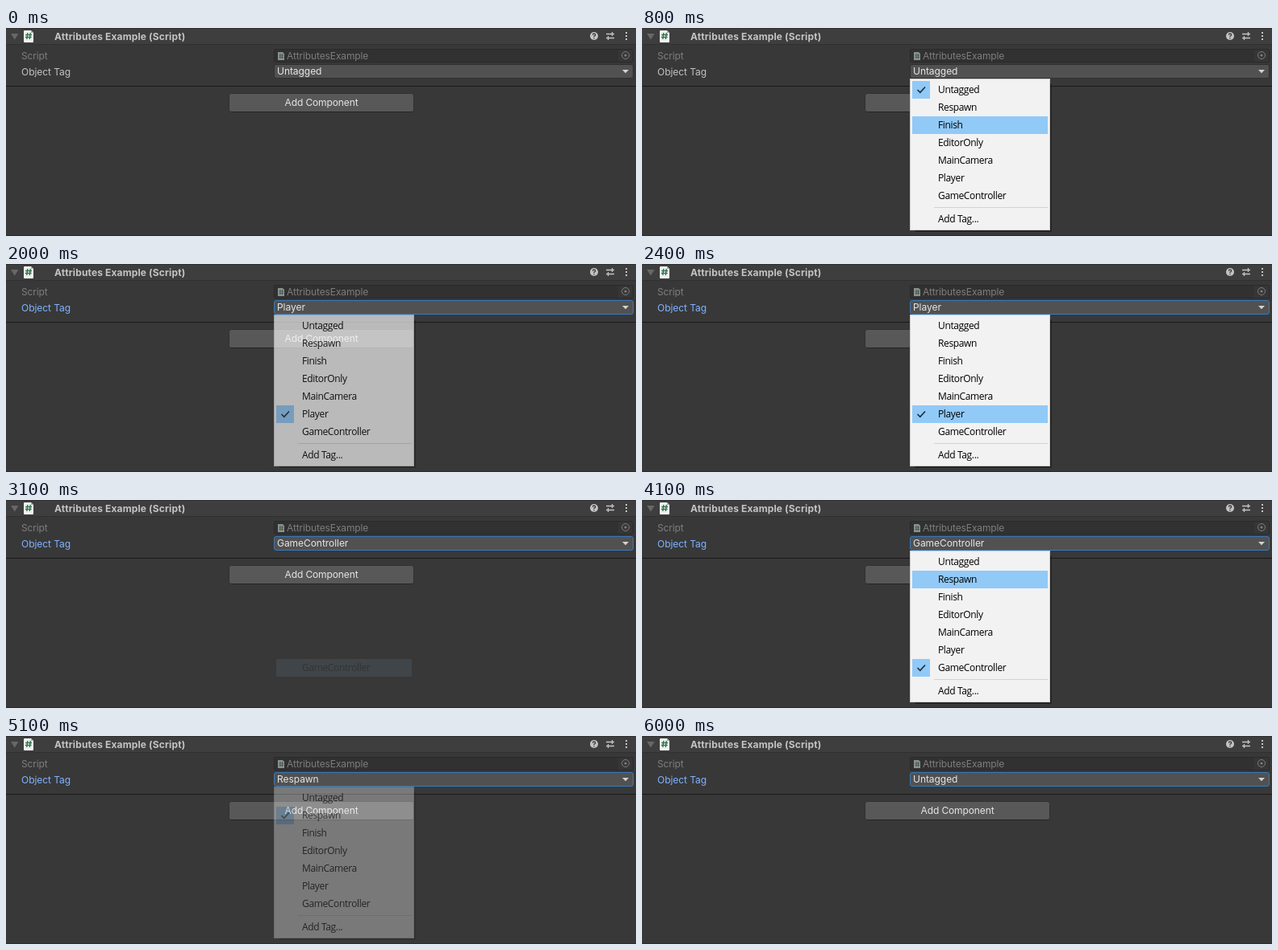
Write an HTML page that moves like this. It is 781 px wide and 259 px high and loops after 6700 ms.

```html
<!DOCTYPE html>
<html lang="en">
<head>
<meta charset="utf-8">
<title>Tag dropdown</title>
<style>
html, body { margin: 0; width: 100%; height: 100%; overflow: hidden; background: #383838; }
svg { display: block; }
text { font: 12px Inter, sans-serif; letter-spacing: -.12px; fill: #c4c4c4; white-space: pre; }
.title { font-weight: 700; letter-spacing: .14px; }
.dim { fill: #7e7e7e; }
.bright { fill: #e6e6e6; }
.focus { fill: #81b4ff; }
#label, #value { letter-spacing: -.05px; }
#menu text, #picked text { font: 12px "Open Sans", "Noto Sans", sans-serif; letter-spacing: -.36px; fill: #000; }
</style>
</head>
<body>
<svg width="781" height="259" viewBox="0 0 781 259">
  <rect width="781" height="259" fill="#383838"/>
  <rect width="781" height="20" fill="#3e3e3e"/>
  <path d="M0 .5H781" stroke="#303030"/>
  <path d="M0 20.5H781" stroke="#303030"/>
  <path d="M0 72.5H781" stroke="#1a1a1a"/>
  <path d="M0 258.5H781" stroke="#2d2a2a"/>

  <path d="M6 7H15.5L10.75 14.5Z" fill="#686868"/>
  <path d="M23 3H31L34 6V17Q34 18 33 18H23Q22 18 22 17V4Q22 3 23 3Z" fill="#f0f0f0"/>
  <path d="M31 3V6H34Z" fill="#a8a8a8"/>
  <path d="M26.8 6L25.8 14M30.3 6L29.3 14M24.2 8.5H32M23.8 11.5H31.6" stroke="#2b7048" stroke-width="1.3"/>
  <text class="title" x="60" y="14.5">Attributes Example (Script)</text>

  <circle cx="729" cy="10" r="5" fill="#c4c4c4"/>
  <path d="M727.3 8.6Q727.5 7 729 7T730.7 8.6Q730.6 9.6 729 10.2V11.2M729 12.2V13.4" stroke="#3e3e3e" stroke-width="1.3" fill="none"/>
  <path d="M744 7.5H754M744 12.5H754M751.5 5V10M746.5 10V15" stroke="#c4c4c4" stroke-width="1.3"/>
  <path d="M768 5h2v2h-2zM768 9h2v2h-2zM768 13h2v2h-2z" fill="#c4c4c4"/>

  <text class="dim" x="19" y="39">Script</text>
  <rect x="332.5" y="26.5" width="445" height="16" rx="2" fill="#313131" stroke="#2a2a2a"/>
  <rect x="759" y="27" width="18" height="15" rx="1" fill="#363636"/>
  <path d="M337 30H343L345 32V40H337Z" fill="#8b918d"/>
  <path d="M340 32V38M342.5 32V38M338.5 34H344M338.5 36.5H344" stroke="#3c5547" stroke-width=".8"/>
  <text class="dim" x="348" y="39">AttributesExample</text>
  <circle cx="768" cy="34" r="4.5" fill="none" stroke="#7e7e7e"/>
  <circle cx="768" cy="34" r="1.6" fill="#7e7e7e"/>

  <text id="label" x="19" y="59">Object Tag</text>
  <rect id="box" x="332.5" y="45.5" width="445" height="17" rx="2.5" fill="#515151"/>
  <text id="value" class="bright" x="336" y="58"></text>
  <path d="M764 52H772L768 56.3Z" fill="#d2d2d2"/>

  <rect x="276.5" y="81.5" width="229" height="23" rx="3" fill="#585858" stroke="#303030"/>
  <path d="M279 104.5H503" stroke="#242424"/>
  <text class="bright" x="391" y="97" text-anchor="middle">Add Component</text>

  <g id="menu">
    <path d="M339 252H506V70H508V254H339Z" fill="#000" opacity=".25"/>
    <path d="M338 252H506V69H507V253H338Z" fill="#000" opacity=".3"/>
    <rect x="332.5" y="63.5" width="173" height="188" fill="#f2f2f2" stroke="#ccc"/>
    <rect id="hover" x="335" width="168" height="22" fill="#91c9f7"/>
    <g id="check">
      <rect x="335" width="22" height="22" fill="#91c9f7"/>
      <path d="M341.5 11L344.8 14.3L351 7.5" fill="none" stroke="#1c2c38" stroke-width="1.6"/>
    </g>
    <path d="M362 223.5H503" stroke="#d3d3d3"/>
    <text x="367" y="242">Add Tag...</text>
  </g>
  <g id="picked">
    <rect x="335" width="168" height="22" fill="#91c9f7"/>
    <text x="367" y="15"></text>
  </g>
</svg>
<script>
const $ = id => document.getElementById(id);
const set = (el, attrs) => { for (const k in attrs) el.setAttribute(k, attrs[k]); };
const LOOP = 6700, STEP = 100;
const tags = ["Untagged", "Respawn", "Finish", "EditorOnly", "MainCamera", "Player", "GameController"];
const rowY = i => 66 + 22 * i;

// fadeIn / fadeOut: opacity per step, the last value holds; hover: [time, row]
const picks = [
  { open: 500, close: 1400, from: 0, to: 5, fadeIn: [.35, .7, 1], fadeOut: [.8, .5, .2, 0],
    hover: [[700, 1], [800, 2], [900, 4], [1000, 5]] },
  { open: 2000, close: 2900, from: 5, to: 6, fadeIn: [.7, 1], fadeOut: [.75, .4, .09],
    hover: [[2200, 1], [2300, 3], [2400, 5], [2500, 6]] },
  { open: 3600, close: 4600, from: 6, to: 1, fadeIn: [.6, 1], fadeOut: [.8, .5, .2, 0],
    hover: [[3900, 0], [4100, 1]] },
  { open: 5100, close: 5800, from: 1, to: 0, fadeIn: [.35, .7, 1], fadeOut: [.65, .3, 0],
    hover: [[5500, 0]] }
];

for (const [i, tag] of tags.entries()) {
  const t = document.createElementNS("http://www.w3.org/2000/svg", "text");
  set(t, { x: 367, y: rowY(i) + 15 });
  t.textContent = tag;
  $("menu").append(t);
}

const fade = (list, since) => list[Math.min(Math.floor(since / STEP), list.length - 1)];

function draw(t) {
  const p = picks.findLast(q => t >= q.open);
  const done = p && t >= p.close;
  const focused = t >= picks[0].close;
  $("value").textContent = tags[p ? (done ? p.to : p.from) : 0];
  set($("label"), { class: focused ? "focus" : "" });
  set($("box"), { stroke: focused ? "#3a79bb" : "#303030" });
  set($("menu"), { opacity: p && !done ? fade(p.fadeIn, t - p.open) : 0 });
  set($("picked"), { opacity: done ? fade(p.fadeOut, t - p.close) : 0 });
  if (!p) return;
  const over = p.hover.findLast(h => t >= h[0]);
  set($("hover"), { y: over ? rowY(over[1]) : 0, opacity: over ? 1 : 0 });
  set($("check"), { transform: `translate(0 ${rowY(p.from)})` });
  set($("picked"), { transform: `translate(0 ${rowY(p.to)})` });
  $("picked").lastElementChild.textContent = tags[p.to];
}

function tick() {
  draw(performance.now() % LOOP);
  requestAnimationFrame(tick);
}
tick();
</script>
</body>
</html>
```
